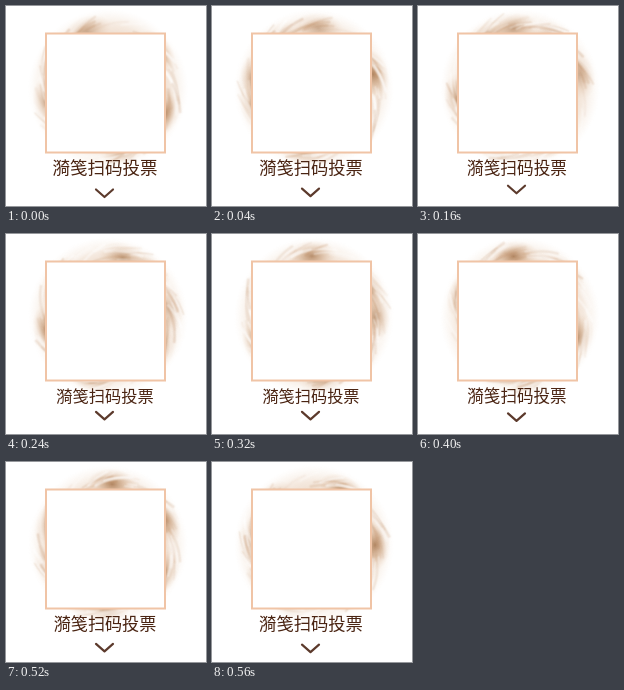
Write an HTML page with a canvas that moves like this. It is 200 px wide and 200 px high and loops after 600 ms.

```html
<!DOCTYPE html>
<html lang="zh-CN">
<head>
<meta charset="utf-8">
<style>
  html, body { margin: 0; width: 100%; height: 100%; overflow: hidden; background: #fff; }
  #stage { position: relative; width: 200px; height: 200px; overflow: hidden; }
  #smoke { position: absolute; left: 12px; top: -7px; width: 180px; height: 180px; }
  svg { position: absolute; left: 0; top: 0; }
  text { font: 17.5px "Noto Sans CJK SC", "Noto Sans CJK", "Noto Sans CJK JP", sans-serif; }
</style>
</head>
<body>
<div id="stage">
  <canvas id="smoke" width="360" height="360"></canvas>
  <svg width="200" height="200" viewBox="0 0 200 200">
    <rect x="40" y="27.5" width="119" height="119" fill="#fff" stroke="#f0c4a6" stroke-width="2"/>
    <g id="label"><text y="6.6" text-anchor="middle" fill="#4a2412">漪笺扫码投票</text></g>
    <path id="arrow" d="M90 0.5L98.5 8L107 0.5" fill="none" stroke="#5c3a2c" stroke-width="2.2"
      stroke-linecap="round" stroke-linejoin="round"/>
  </svg>
</div>
<script>
const smoke = document.getElementById('smoke');
const label = document.getElementById('label');
const arrow = document.getElementById('arrow');

const STEP = 40, STEPS = 15, TURN = 7;
// Dense patches of the ring: angle in degrees, strength
const PATCHES = [[24, 1], [76, .9], [140, .8], [168, .75], [208, .45], [250, .6], [322, 1]];

let seed = 11;
const rand = () => (seed = seed * 16807 % 2147483647) / 2147483647;
const rad = deg => deg * Math.PI / 180;

function paintSmoke() {
  const c = smoke.getContext('2d');
  c.scale(2, 2);
  c.translate(90, 90);

  const haze = c.createRadialGradient(0, 0, 50, 0, 0, 80);
  haze.addColorStop(0, 'rgba(205,155,110,.38)');
  haze.addColorStop(.45, 'rgba(215,170,130,.26)');
  haze.addColorStop(.8, 'rgba(230,200,170,.1)');
  haze.addColorStop(1, 'rgba(240,220,200,0)');
  c.fillStyle = haze;
  c.fillRect(-90, -90, 180, 180);

  for (const [angle, power] of PATCHES) {
    c.save();
    c.rotate(rad(angle));
    c.translate(61, 0);
    c.scale(.62, 1);
    const blob = c.createRadialGradient(0, 0, 0, 0, 0, 25);
    blob.addColorStop(0, `rgba(146,88,40,${.68 * power})`);
    blob.addColorStop(.45, `rgba(180,122,72,${.36 * power})`);
    blob.addColorStop(1, 'rgba(225,185,150,0)');
    c.fillStyle = blob;
    c.fillRect(-30, -30, 60, 60);
    c.restore();
  }

  // Spiral wisps, brown and white
  c.filter = 'blur(1.6px)';
  c.lineCap = 'round';
  for (let i = 0; i < 64; i++) {
    const start = rand() * 360, span = 16 + rand() * 24;
    const inner = 57 + rand() * 10, rise = 4 + rand() * 9;
    c.strokeStyle = i % 2 ? `rgba(255,255,255,${.2 + rand() * .35})`
                          : `rgba(176,118,70,${.06 + rand() * .14})`;
    c.lineWidth = 1 + rand() * 2.2;
    c.beginPath();
    for (let k = 0; k <= 8; k++) {
      const a = rad(start + span * k / 8), r = inner + rise * k / 8;
      c.lineTo(r * Math.cos(a), r * Math.sin(a));
    }
    c.stroke();
  }
}

function draw(now) {
  const step = Math.floor(now / STEP) % STEPS;
  const dip = step <= TURN ? step / TURN : (STEPS - step) / (STEPS - TURN);
  smoke.style.transform = `rotate(${step * 360 / STEPS}deg)`;
  label.setAttribute('transform', `translate(99 161.5) scale(${1 - .085 * dip})`);
  arrow.setAttribute('transform', `translate(0 ${183 - 6.5 * dip})`);
}

paintSmoke();
const begin = performance.now();
function tick() {
  draw(performance.now() - begin);
  requestAnimationFrame(tick);
}
tick();
</script>
</body>
</html>
```
